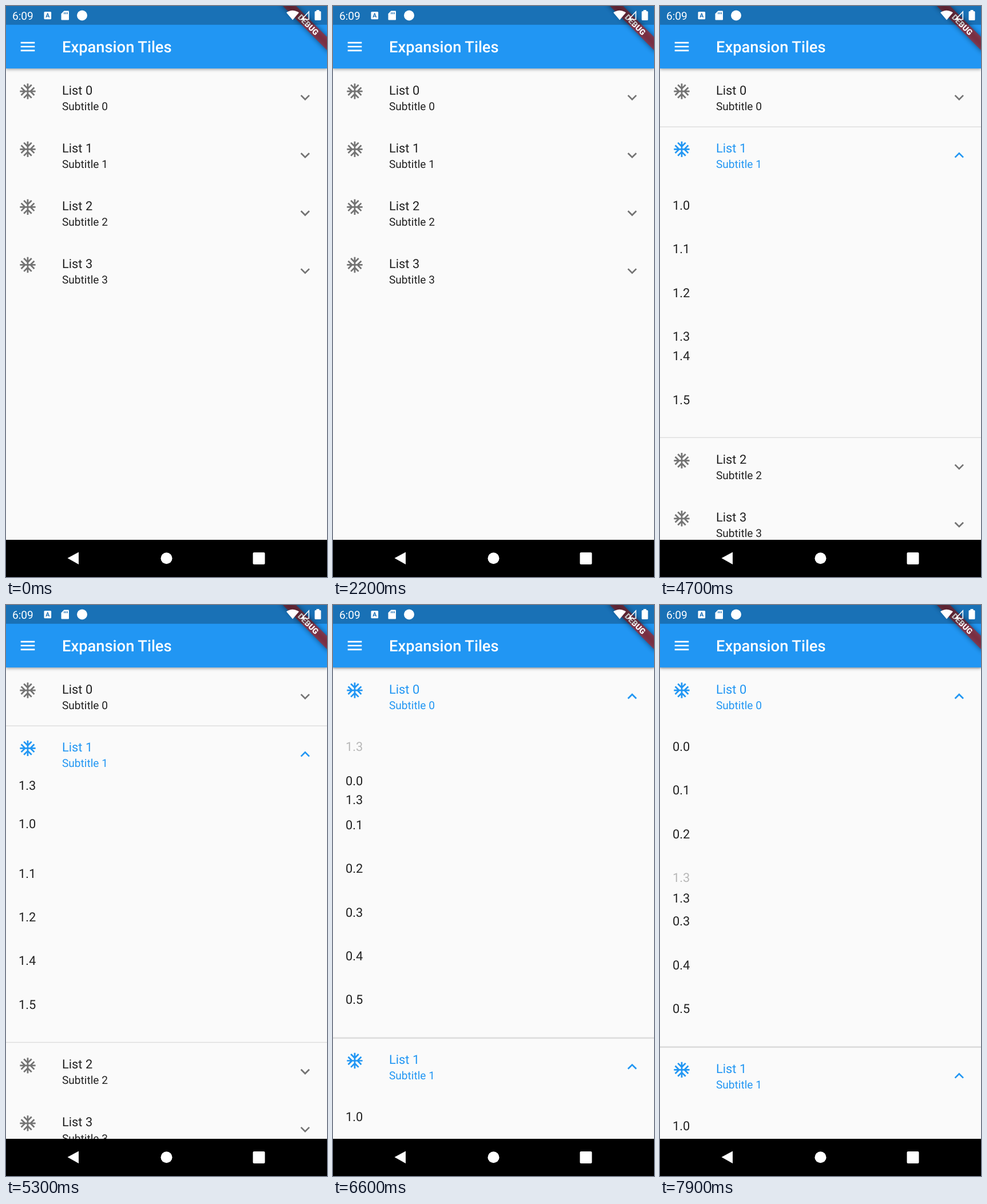
Animation, 561 px wide and 998 px high, one loop 8000 ms. Source, as an HTML page:

```html
<!DOCTYPE html>
<html lang="en">
<head>
<meta charset="utf-8">
<title>Expansion Tiles</title>
<style>
  html, body { margin: 0; height: 100%; overflow: hidden; background: #fafafa; }
  svg { display: block; }
  text { font: 21.84px Roboto, sans-serif; text-rendering: geometricPrecision; }
  text.small { font-size: 19.1px; }
</style>
</head>
<body>
<svg id="stage" width="100%" height="100%" viewBox="0 0 561 998">
  <g id="lists"></g>
  <text id="drag" x="22" fill="#212121">1.3</text>

  <rect id="bar" width="561" height="109.2" fill="#2196f3" style="filter: drop-shadow(0 2px 2.5px rgba(0,0,0,.32))"/>
  <path transform="translate(38 71) scale(1.365)" d="M-9-6h18v2h-18zm0 5h18v2h-18zm0 5h18v2h-18z" fill="#fff"/>
  <text x="98" y="80.7" fill="#fff" style="font-size: 27.3px; font-weight: 500">Expansion Tiles</text>

  <g transform="translate(561 0) rotate(45)">
    <rect x="-60" y="38.2" width="120" height="16.4" opacity=".5" style="filter: blur(5px)"/>
    <rect x="-60" y="38.2" width="120" height="16.4" fill="#b71c1c" fill-opacity=".627"/>
    <text y="51.3" text-anchor="middle" fill="#fff" style="font-size: 13.9px; font-weight: 900">DEBUG</text>
  </g>

  <rect width="561" height="32.8" opacity=".25"/>
  <g fill="#fff">
    <text class="small" x="11" y="23.7">6:09</text>
    <rect x="66.5" y="10" width="12.6" height="13.2" rx="1.5"/>
    <text x="72.8" y="20.4" text-anchor="middle" fill="#1a70b7" style="font-size: 10.5px; font-weight: 700">A</text>
    <path d="M101.5 8.5H109q1 0 1 1V23.500q0 1-1 1H97.500q-1 0-1-1V13.500z"/>
    <path d="M101.800 11v3.200m2.700-3.200v3.200m2.700-3.200v3.200" stroke="#1a70b7" stroke-width="1.300"/>
    <circle cx="133" cy="16.500" r="9"/>
    <path d="M490 11.500Q501 4 512 11.500L501 24.500z"/>
    <path d="M517 23.500H529.300V10z" fill="none" stroke="#fff" stroke-width="1.600"/>
    <path d="M515 24.300l6-6.500v6.500z"/>
    <path d="M542.500 7h5v2H549q1.500 0 1.500 1.500v13q0 1.500-1.500 1.500H541q-1.500 0-1.500-1.500v-13q0-1.500 1.500-1.500h1.500z"/>
  </g>

  <rect y="933" width="561" height="65"/>
  <g fill="#fff">
    <path d="M107.500 965L127 954.500V976z"/>
    <circle cx="280.500" cy="965.300" r="10"/>
    <rect x="431.500" y="955" width="21" height="21" rx="2"/>
  </g>
</svg>

<script>
const LOOP = 8000, TOP = 109.5, HEAD = 101.1, ROW = 76.43, PAD = 27, PICK = 4618;
const FLAKE = 'M22 11h-4.17l3.24-3.24-1.41-1.42L15 11h-2V9l4.66-4.66-1.42-1.41L13 6.17V2h-2v4.17L7.76 2.93 6.34 4.34 11 9v2H9L4.34 6.34 2.93 7.76 6.17 11H2v2h4.17l-3.24 3.24 1.41 1.42L9 13h2v2l-4.66 4.66 1.42 1.41L11 17.83V22h2v-4.17l3.24 3.24 1.42-1.41L13 15v-2h2l4.66 4.66 1.41-1.42L17.83 13H22z';
const CHEVRON = 'M4.59-3.41L0 1.17-4.59-3.41-6-2 0 4 6-2z';
const BLUE = [33, 150, 243], DARK = [33, 33, 33], GRAY = [115, 115, 115];

// Gaps before each row as [time, openness] points
const gaps = [
  [
    [[6482, 0], [6632, 1], [6750, 1], [6900, 0]],
    [[6750, 0], [6900, 1], [7050, 0]],
    [[6900, 0], [7050, 1], [7200, 0]],
    [[7050, 0], [7200, 1]]
  ],
  [
    [[5233, 0], [5383, 1], [5500, 1], [5650, 0]],
    [[5020, 0], [5170, 1], [5320, 0]],
    [[4860, 0], [5010, 1], [5030, 1], [5180, 0]],
    [[PICK, 1], [4768, 0], [4780, 0], [4860, .5], [4950, 0]]
  ],
  [], []
];
const dragPath = [[4730, 577.4], [5300, 316.3], [5500, 250], [5800, 148], [6400, 148],
  [6600, 340], [7200, 556], [7500, 556], [7700, 515], [7800, 515], [7900, 512.7]];
const opening = [[6050, 6280], [2280, 2500]];
const rowNames = [['0.0', '0.1', '0.2', '0.3', '0.4', '0.5'], ['1.0', '1.1', '1.2', '1.4', '1.5'], [], []];

const $ = id => document.getElementById(id);
const clamp = x => Math.min(1, Math.max(0, x));
const mix = (a, b, k) => `rgb(${a.map((v, i) => v + (b[i] - v) * k)})`;

function along(points, t) {
  if (t <= points[0][0]) return points[0][1];
  for (let i = 1; i < points.length; i++) {
    const [t0, a] = points[i - 1], [t1, b] = points[i];
    if (t < t1) return a + (b - a) * (t - t0) / (t1 - t0);
  }
  return points.at(-1)[1];
}

function set(node, attrs) {
  for (const k in attrs) node.setAttribute(k, attrs[k]);
  return node;
}

function add(parent, tag, attrs, text = '') {
  const node = set(document.createElementNS('http://www.w3.org/2000/svg', tag), attrs);
  node.textContent = text;
  return parent.appendChild(node);
}

const lists = gaps.map((slots, i) => {
  const g = add($('lists'), 'g', {});
  const line = () => add(g, 'rect', { width: 561, height: 1.37 });
  const row = name => add(body, 'text', { x: 22, fill: '#212121' }, name);
  const clip = add(g, 'svg', { y: 99.5, width: 561 });
  const body = add(clip, 'g', {});
  return {
    g, clip, body, slots,
    span: opening[i],
    rows: rowNames[i].map(row),
    ghosts: slots.map(() => row('1.3')),
    upper: line(), lower: line(),
    icon: add(g, 'path', { d: FLAKE, transform: 'translate(21.6 23.3) scale(1.365)' }),
    title: add(g, 'text', { x: 98, y: 45.2 }, 'List ' + i),
    sub: add(g, 'text', { x: 98, y: 72.3, class: 'small' }, 'Subtitle ' + i),
    arrow: add(g, 'path', { d: CHEVRON })
  };
});

function drawList(list, top, t) {
  const [from, to] = list.span || [Infinity, Infinity];
  const open = t < from ? 0 : clamp((t - from) / (to - from)) ** 1.7;
  let y = 0;
  const place = node => set(node, { y: y + ROW / 2 + 7.5 });

  list.rows.forEach((node, j) => {
    if (list.slots[j]) {
      const v = along(list.slots[j], t);
      const shown = t < PICK ? v : .3 * clamp((v - .5) * 5);
      set(place(list.ghosts[j]), { opacity: shown });
      y += v * ROW;
    }
    place(node);
    y += ROW;
  });

  const full = y + PAD, height = full * open, ink = mix(DARK, BLUE, open);
  set(list.g, { transform: `translate(0 ${top})` });
  set(list.clip, { height });
  set(list.body, { transform: `translate(0 ${(height - full) / 2})` });
  set(list.upper, { opacity: .12 * open });
  set(list.lower, { y: HEAD + height - 1.37, opacity: .12 * open });
  set(list.title, { fill: ink });
  set(list.sub, { fill: ink });
  set(list.icon, { fill: mix(GRAY, BLUE, open) });
  set(list.arrow, {
    fill: mix(GRAY, BLUE, open),
    transform: `translate(522.8 50.3) scale(1.365) rotate(${180 * open})`
  });
  return top + HEAD + height;
}

function frame(now) {
  const t = now % LOOP;
  lists.reduce((top, list) => drawList(list, top, t), TOP);
  set($('drag'), { y: along(dragPath, t) + 7.5, opacity: t < PICK ? 0 : 1 });
  requestAnimationFrame(frame);
}
frame(performance.now());
</script>
</body>
</html>
```
